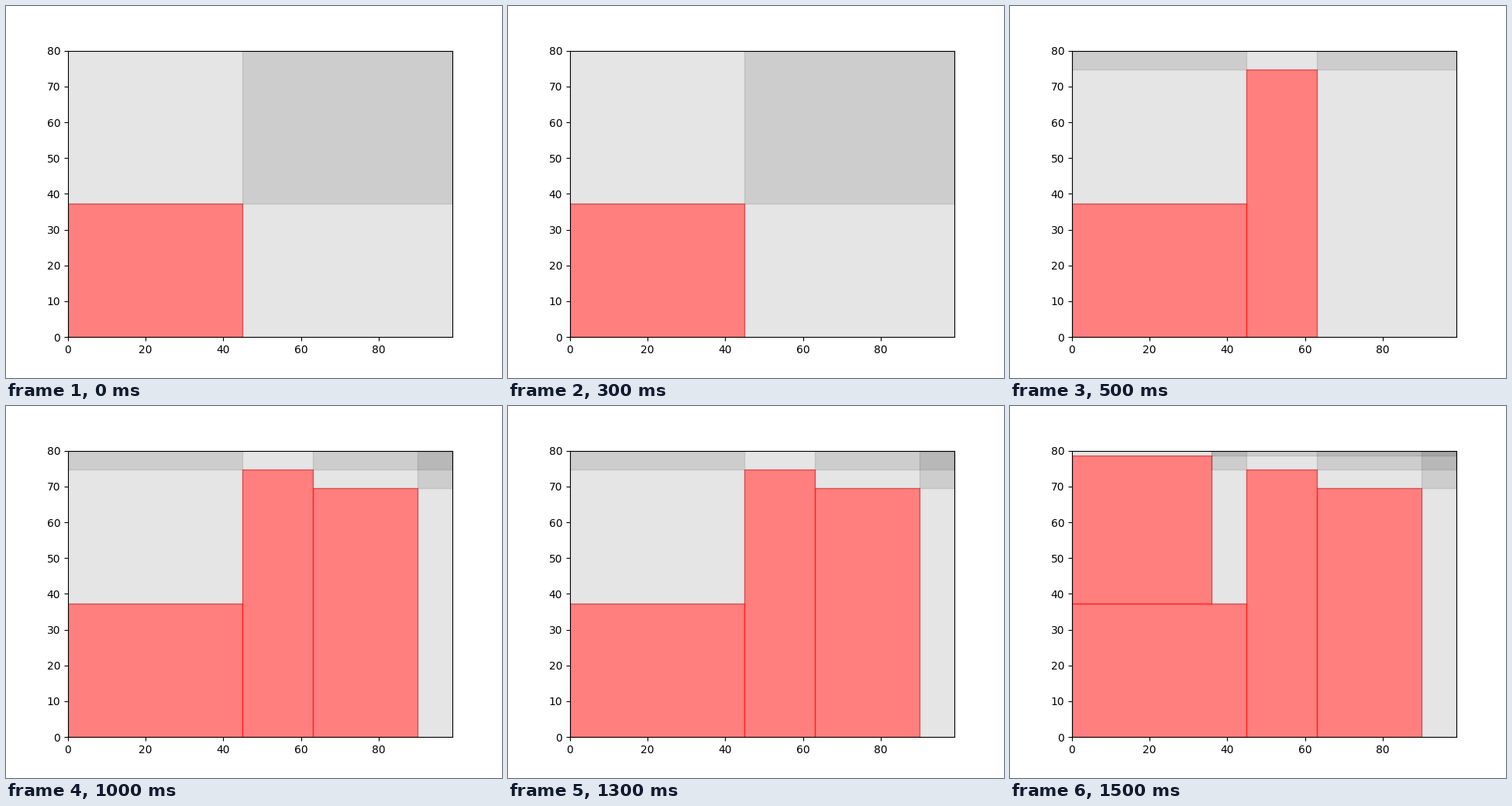
A matplotlib script that plays this animation: 640x480 px, repeating every 2 s.

```python
import matplotlib.pyplot as plt
from matplotlib.animation import FuncAnimation
from matplotlib.patches import Rectangle

WIDTH, HEIGHT = 99, 80
# Placed boxes as (left, bottom, right, top), in packing order
BOXES = [
    (0, 0, 45, 37.3),
    (45, 0, 63, 74.7),
    (63, 0, 90, 69.5),
    (0, 37.3, 36, 78.6),
]


def overlaps(a, b):
    return a[0] < b[2] and b[0] < a[2] and a[1] < b[3] and b[1] < a[3]


def contains(a, b):
    return a[0] <= b[0] and a[1] <= b[1] and a[2] >= b[2] and a[3] >= b[3]


def split(space, box):
    """Maximal parts of a free space that remain around a box."""
    if not overlaps(space, box):
        return [space]
    l, b, r, t = space
    parts = [(l, b, box[0], t), (box[2], b, r, t),
             (l, b, r, box[1]), (l, box[3], r, t)]
    return [p for p in parts if p[0] < p[2] and p[1] < p[3]]


def free_spaces(boxes):
    spaces = [(0, 0, WIDTH, HEIGHT)]
    for box in boxes:
        parts = {p for s in spaces for p in split(s, box)}
        spaces = sorted(p for p in parts
                        if not any(q != p and contains(q, p) for q in parts))
    return spaces


fig, ax = plt.subplots(figsize=(6.4, 4.8), dpi=100)
ax.set_xlim(0, WIDTH)
ax.set_ylim(0, HEIGHT)


def add_rect(rect, color, alpha):
    l, b, r, t = rect
    ax.add_patch(Rectangle((l, b), r - l, t - b, color=color, alpha=alpha))


def draw(step):
    for patch in list(ax.patches):
        patch.remove()
    placed = BOXES[:step + 1]
    for box in placed:
        add_rect(box, "red", 0.5)
    for space in free_spaces(placed):
        add_rect(space, "black", 0.1)
    return ax.patches


anim = FuncAnimation(fig, draw, frames=len(BOXES), interval=500,
                     repeat=True, repeat_delay=0, blit=False)
plt.show()
```
